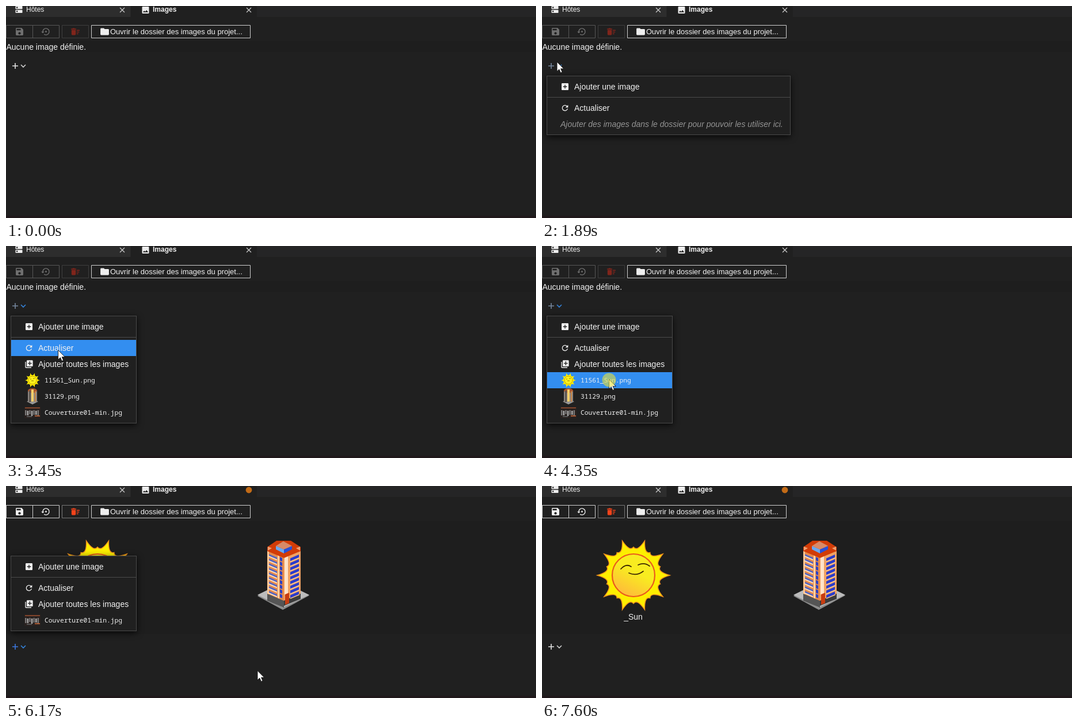
These frames come from a looping animation (921 px wide and 368 px high, 8.06 s). An HTML page:

```html
<!DOCTYPE html>
<html lang="fr">
<head>
<meta charset="utf-8">
<title>Images</title>
<style>
html, body { margin: 0; width: 100%; height: 100%; overflow: hidden; background: #202020; }
svg { display: block; }
text { font: 14px "Liberation Sans", Arial, sans-serif; fill: #f2f2f2; white-space: pre; }
.mono { font: 11.25px "Noto Sans Mono", "DejaVu Sans Mono", monospace; }
.line { fill: none; stroke-width: 1; }
#panel { fill: #202020; stroke: #4a4a4a; filter: drop-shadow(0 3px 6px #000c); }
</style>
</head>
<body>
<svg id="stage" width="921" height="368" viewBox="0 0 921 368"></svg>
<script>
const LOOP = 8060;
const ICONS = {
  hosts: 'M20 13H4c-.55 0-1 .45-1 1v6c0 .55.45 1 1 1h16c.55 0 1-.45 1-1v-6c0-.55-.45-1-1-1zM7 19a2 2 0 1 1 0-4 2 2 0 0 1 0 4zM20 3H4c-.55 0-1 .45-1 1v6c0 .55.45 1 1 1h16c.55 0 1-.45 1-1V4c0-.55-.45-1-1-1zM7 9a2 2 0 1 1 0-4 2 2 0 0 1 0 4z',
  image: 'M21 19V5c0-1.1-.9-2-2-2H5c-1.1 0-2 .9-2 2v14c0 1.1.9 2 2 2h14c1.1 0 2-.9 2-2zM8.5 13.5l2.5 3 3.5-4.5 4.5 6H5z',
  save: 'M17 3H5c-1.1 0-2 .9-2 2v14c0 1.1.9 2 2 2h14c1.1 0 2-.9 2-2V7zM12 19a3 3 0 1 1 0-6 3 3 0 0 1 0 6zm3-10H5V5h10z',
  restore: 'M14 12a2 2 0 1 0-4 0 2 2 0 0 0 4 0zM12 3a9 9 0 0 0-9 9H0l4 4 4-4H5a7 7 0 1 1 2.94 5.7l-1.42 1.44A9 9 0 1 0 12 3z',
  sweep: 'M15 16h4v2h-4zm0-8h7v2h-7zm0 4h6v2h-6zM3 18c0 1.1.9 2 2 2h6c1.1 0 2-.9 2-2V8H3zM14 5h-3l-1-1H6L5 5H2v2h12z',
  folder: 'M10 4H4c-1.1 0-2 .9-2 2v12c0 1.1.9 2 2 2h16c1.1 0 2-.9 2-2V8c0-1.1-.9-2-2-2h-8z',
  add: 'M19 3H5c-1.1 0-2 .9-2 2v14c0 1.1.9 2 2 2h14c1.1 0 2-.9 2-2V5c0-1.1-.9-2-2-2zm-2 10h-4v4h-2v-4H7v-2h4V7h2v4h4z',
  refresh: 'M17.65 6.35A8 8 0 1 0 19.73 14h-2.08A6 6 0 1 1 16.22 7.78L13 11h7V4z',
  addAll: 'M4 6H2v14c0 1.1.9 2 2 2h14v-2H4zm16-4H8c-1.1 0-2 .9-2 2v12c0 1.1.9 2 2 2h12c1.1 0 2-.9 2-2V4c0-1.1-.9-2-2-2zm-1 9h-4v4h-2v-4H9V9h4V5h2v4h4z'
};

const icon = (name, x, y, s = .667, fill = '#eee', id = '') =>
  `<path id="${id}" d="${ICONS[name]}" fill="${fill}" transform="translate(${x - 12 * s} ${y - 12 * s}) scale(${s})"/>`;
const rect = (x, y, w, h, fill, extra = '') =>
  `<rect x="${x}" y="${y}" width="${w}" height="${h}" fill="${fill}" ${extra}/>`;
const poly = (points, fill) => `<polygon points="${points}" fill="${fill}"/>`;
const text = (s, x, y, extra = '') => `<text x="${x}" y="${y}" ${extra}>${s}</text>`;
const cross = x => `<path d="M${x - 4} 3l8 8m0-8l-8 8" stroke="#ccc" stroke-width="1.2"/>`;
const repeat = (n, f) => Array.from({ length: n }, (_, i) => f(i)).join('');

// Spiky outline with alternating long and short rays and hollow flanks
function rays(n, long, short, dip) {
  const at = (r, k) => {
    const a = k * Math.PI / n;
    return `${(r * Math.cos(a)).toFixed(1)} ${(r * Math.sin(a)).toFixed(1)}`;
  };
  return `M${at(long, 0)}` + repeat(2 * n, k => `Q${at(dip, k + .5)} ${at(k % 2 ? long : short, k + 1)}`) + 'Z';
}

const sun = `<g transform="translate(159 155)">
  <path d="${rays(10, 63, 49, 41)}" fill="#fdee00" stroke="#f0921a" stroke-width="1.4"/>
  <circle r="37" fill="url(#glow)" stroke="#ea5a1c" stroke-width="2.2"/>
  <path d="M-22 -11Q-13 -21 -4 -15M8 -18Q19 -23 28 -16M-8 -4Q5 2 17 -7" fill="none" stroke="#3a2600" stroke-width="1.7" stroke-linecap="round"/>
  </g>`;

const building =
  poly('437,191 482,168 527,190 481,215', '#8c8c8c') +
  poly('437,189 482,167 527,189 481,211', '#bcbcbc') +
  `<g transform="matrix(1 .42 0 1 454 111)">` +
    rect(0, 0, 29, 83, '#e58a4c') + rect(0, 0, 3, 76, '#ffc590') + rect(18, 0, 3, 76, '#ffd2a4') +
    rect(22, 3, 4, 70, '#2c43c8') + rect(0, 76, 29, 12, '#555') +
    repeat(9, i => rect(3, 6 + 8 * i, 14, 3, '#4d64c8') + rect(2, 9 + 8 * i, 15, 2, '#ffe0c0') + rect(22, 9 + 8 * i, 4, 2, '#e58a4c')) +
  `</g><g transform="matrix(1 -.42 0 1 483 123)">` +
    rect(0, 0, 29, 83, '#f0a264') + rect(1, 0, 6, 66, '#ffe3c8') + rect(0, 76, 29, 9, '#3c3c3c') +
    repeat(9, i => rect(11, 7 + 8 * i, 15, 5, '#2a3ccc') + rect(11, 12 + 8 * i, 16, 1.5, '#ffc894')) +
    rect(2, 66, 7, 18, '#c83c10') +
  `</g>` +
  poly('454,113 454,106 470,95 495,95 512,106 512,113 483,125', '#d23c08') +
  poly('455,105 462,108 455,112', '#f0a070') + poly('511,105 504,108 511,112', '#f0a070') +
  poly('469,104 483,110 483,117 469,110', '#6aa8f0') + poly('483,110 497,104 497,110 483,117', '#2850d8') +
  poly('469,104 482,96 497,104 483,110', '#d88a68');

const thumbs = [
  ['11561_Sun.png', `<g transform="translate(46 233)"><path d="${rays(10, 13, 9, 8)}" fill="#ffee00"/>
    <circle r="7" fill="#fff21a" stroke="#b88c00" stroke-width=".8"/><path d="M-4 -2h2m3 -1h3m-6 4h4" stroke="#6a5000" stroke-width=".8"/></g>`],
  ['31129.png', poly('36,270 46,266 56,270 46,275', '#999') + rect(38, 251, 16, 20, '#8d8782') +
    `<ellipse cx="46" cy="251" rx="8" ry="4" fill="#a9562e"/>` + rect(40, 251, 3, 20, '#5c5652') +
    rect(44, 249, 4, 21, '#f4cf6a') + rect(50, 252, 2, 18, '#c98646')],
  ['Couverture01-min.jpg', rect(32, 279, 28, 20, '#29211f') + rect(33, 280, 26, 2, '#80452c') +
    repeat(7, i => rect(33 + 3.6 * i, 285 + i % 2, 2.5, 9 - i % 3, i % 2 ? '#a9a9a9' : '#777')) +
    rect(50, 294, 9, 2, '#a95c36') + rect(36, 295, 9, 2, '#555')]
];

document.getElementById('stage').innerHTML = `
<defs><linearGradient id="glow" x1=".7" y1=".1" x2=".25" y2="1">
  <stop offset=".35" stop-color="#f8ec20"/><stop offset="1" stop-color="#ffb63c"/></linearGradient></defs>
${rect(0, 0, 921, 368, '#202020') + rect(0, 0, 921, 19, '#252526') + rect(0, 0, 216, 19, '#2d2d2d') + rect(217, 0, 219, 19, '#202020')}
${rect(0, 364, 921, 4, '#20191b')}
${icon('hosts', 22.5, 6) + text('Hôtes', 35, 10, 'style="font-size:12px"') + cross(202)}
${icon('image', 242.5, 7) + text('Images', 255, 10, 'style="font-size:12px;font-weight:bold"')}
<g id="close">${cross(422)}</g><circle id="dirty" cx="422" cy="7" r="5.4" fill="#c36b17"/>
<path id="group" class="line" d="M.5 33.5h92v22h-92zM46.5 33.5v22"/>
<path id="trash" class="line" d="M97.5 33.5h46v22h-46z"/>
<path class="line" d="M148.5 33.5h276v22h-276z" stroke="#cfcfcf"/>
${icon('save', 23.5, 44.5, .72, '', 'save') + icon('restore', 69.5, 44.5, .7, '', 'restore') + icon('sweep', 120.5, 44.5, .74, '', 'sweep')}
${icon('folder', 171.5, 44.5, .74) + text('Ouvrir le dossier des images du projet...', 181, 49, 'style="font-size:13px"')}
<rect id="list" y="61" width="921" fill="#1e1e1e"/>
${text('Aucune image définie.', 0.5, 76, 'id="none"')}
<g id="sun">${sun + text('_Sun', 158.5, 232, 'text-anchor="middle"')}</g>
<g id="building">${building}</g>
<g id="more" fill="none" stroke-width="1.6"><path id="plus" d="M11 104h10m-5-5v10"/><path id="chevron" d="M26 102l4 4 4-4"/></g>
<g id="menu">
  <rect id="panel" x="8.5" y="121.5"/><rect id="hover" x="9" height="28" fill="#338ef0"/>
  <path id="rule" stroke="#4a4a4a"/>
  ${icon('add', 40, 140) + text('Ajouter une image', 56, 145) + icon('refresh', 40, 177) + text('Actualiser', 56, 182)}
  ${text('Ajouter des images dans le dossier pour pouvoir les utiliser ici.', 32, 210, 'id="hint" style="font-style:italic;fill:#949494"')}
  <g id="all">${icon('addAll', 40, 205) + text('Ajouter toutes les images', 56, 210)}</g>
  ${thumbs.map(([name, art], i) => `<g id="thumb${i}">${art + text(name, 67, 237 + 28 * i, 'class="mono"')}</g>`).join('')}
</g>
<path id="cursor" d="M0 0v16.5l3.8-3.6 2.6 6 2.7-1.2-2.5-5.8h5.2z" fill="#fff" stroke="#111" stroke-width=".9"/>
<circle id="click" r="12" fill="#e6e03c" opacity=".6"/>`;

const $ = id => document.getElementById(id);
const show = (id, on) => $(id).style.display = on ? '' : 'none';
const set = (id, attrs) => { for (const k in attrs) $(id).setAttribute(k, attrs[k]); };
const within = (t, a, b) => t >= a && t < b;

// Pointer stops: time, x, y
const PATH = [
  [720, 770, 390], [1400, 27, 84], [1550, 24, 93], [1680, 26, 97], [2220, 26, 97], [2430, 86.5, 165],
  [2560, 90, 178], [2700, 90, 178], [2970, 90.5, 180.5], [3430, 90.5, 180.5], [3940, 116.5, 231.5],
  [5700, 116.5, 231.5], [6170, 437, 320.5], [6510, 430.5, 314], [7230, 430.5, 314], [7600, 880, 364]
];
const CLICKS = [[1820, 1890], [2700, 2900], [4210, 4550], [5080, 5210], [6650, 6860]];

function pointer(t) {
  const i = PATH.findIndex(p => p[0] > t);
  if (i < 1) return PATH[i < 0 ? PATH.length - 1 : 0].slice(1);
  const [t0, x0, y0] = PATH[i - 1], [t1, x1, y1] = PATH[i];
  const u = (t - t0) / (t1 - t0), e = u * u * (3 - 2 * u);
  return [x0 + (x1 - x0) * e, y0 + (y1 - y0) * e];
}

function draw(t) {
  const added = (t >= 4550) + (t >= 5210);
  const open = within(t, 1890, 6860), loaded = t >= 2900, on = added > 0;

  show('close', !on);
  show('dirty', on);
  show('none', !on);
  show('sun', on);
  show('building', added > 1);
  set('group', { stroke: on ? '#d0d0d0' : '#575757' });
  set('trash', { stroke: on ? '#777' : '#3e3e3e' });
  set('save', { fill: on ? '#f0f0f0' : '#707070' });
  set('restore', { fill: on ? '#f0f0f0' : '#707070' });
  set('sweep', { fill: on ? '#f4431a' : '#80251b' });
  set('list', { height: on ? 196 : 19 });
  set('more', { transform: `translate(0 ${on ? 175 : 0})` });
  set('plus', { stroke: !open ? '#e4e4e4' : on ? '#3c78e0' : '#76889e' });
  set('chevron', { stroke: open ? '#3584dc' : '#d0d0d0' });

  const width = loaded ? 218 : 423;
  show('menu', open);
  set('panel', { width, height: loaded ? 186 - 28 * added : 102 });
  set('rule', { d: `M9 158.5h${width - 1}` });
  show('hint', !loaded);
  show('all', loaded);
  thumbs.forEach((_, i) => {
    show('thumb' + i, loaded && i >= added);
    set('thumb' + i, { transform: `translate(0 ${-28 * added})` });
  });

  // The highlight trails the pointer slightly and drops out while the list reloads
  const [hx, hy] = pointer(t - 70), row = Math.floor((hy - 163) / 28);
  const rows = loaded ? 5 - added : 1;
  show('hover', row >= 0 && row < rows && hx < 9 + width && !within(t, 2900, 3120));
  set('hover', { y: 163 + 28 * row, width: width - 1 });

  const [x, y] = pointer(t);
  show('cursor', within(t, 790, 7600));
  set('cursor', { transform: `translate(${x} ${y})` });
  show('click', CLICKS.some(([a, b]) => within(t, a, b)));
  set('click', { cx: x, cy: y + 1 });
}

const start = performance.now();
function tick() {
  draw((performance.now() - start) % LOOP);
  requestAnimationFrame(tick);
}
tick();
</script>
</body>
</html>
```
